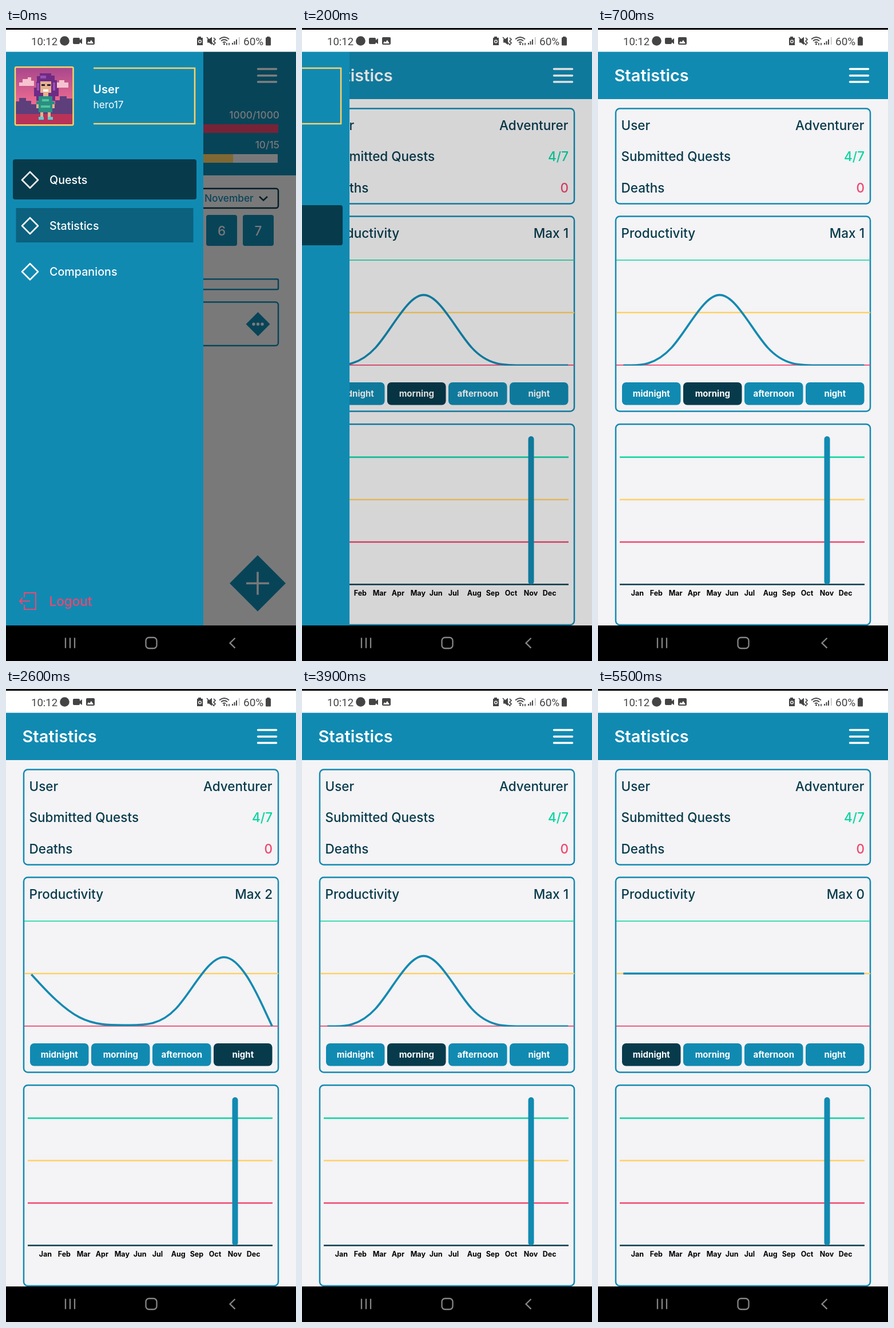
These frames come from a looping animation (507x1104 px, 5.6 s). An HTML page:

```html
<!DOCTYPE html>
<html lang="en">
<head>
<meta charset="utf-8">
<title>Statistics screen</title>
<style>
  html, body { margin: 0; height: 100%; overflow: hidden; background: #000; }
  svg { display: block; width: 100vw; height: 100vh; font: 500 22.5px Inter, sans-serif; }
  .blue { fill: #118ab2; }
  .dark { fill: #073b4c; }
  .pale { fill: #f4f3f5; }
  .line { fill: none; stroke: #118ab2; stroke-width: 2.5; }
  .icon { fill: none; stroke: #fff; stroke-width: 2.6; stroke-linejoin: round; }
  .end { text-anchor: end; }
  .mid { text-anchor: middle; }
  .small { font-size: 17.3px; }
  .item { font-size: 19.7px; fill: #fff; }
  .tab { font-size: 15px; font-weight: 700; fill: #fff; }
  .month { font-size: 12.5px; font-weight: 700; fill: #000; }
</style>
</head>
<body>
<svg viewBox="0 0 507 1104">
  <defs>
    <clipPath id="plot"><rect x="32" y="404" width="444" height="184.7"/></clipPath>
    <linearGradient id="sky" x2="0" y2="1">
      <stop stop-color="#a8468c"/><stop offset=".6" stop-color="#ea6a90"/>
    </linearGradient>
    <path id="gem" d="M0-14 14 0 0 14-14 0z" class="icon"/>
  </defs>

  <rect class="pale" width="507" height="1104"/>

  <g id="questPage">
    <rect class="blue" y="41" width="507" height="216"/>
    <g class="small end" fill="#f4f3f5">
      <text x="478" y="158">1000/1000</text>
      <text x="478" y="209.500">10/15</text>
    </g>
    <rect x="300" y="168" width="176" height="15" fill="#ef476f"/>
    <rect class="pale" x="300" y="220" width="175" height="15"/>
    <rect x="300" y="220" width="97" height="15" fill="#ffd166"/>
    <rect x="300" y="280" width="176" height="34" rx="4" class="line" style="stroke:#073b4c"/>
    <text class="small blue" x="347" y="303">November</text>
    <path d="m443 294 7 6.500 7-6.500" class="line" style="stroke:#073b4c"/>
    <rect class="blue" x="350" y="326" width="54" height="54" rx="4"/>
    <rect class="blue" x="414" y="326" width="54" height="54" rx="4"/>
    <g class="mid" fill="#f4f3f5"><text x="377" y="362">6</text><text x="441" y="362">7</text></g>
    <rect x="300" y="438" width="176" height="18" rx="2" class="line"/>
    <rect x="300" y="478" width="176" height="76" rx="5" class="line"/>
    <path class="blue" d="m440.500 495.500 21 21-21 21-21-21z"/>
    <path d="M433 516.500h0m7.500 0h0m7.500 0h0" stroke="#f4f3f5" stroke-width="5.400" stroke-linecap="round"/>
    <path class="blue" d="m440 919.500 49 49-49 49-49-49z"/>
    <path d="M420 968.500h40m-20-20v40" stroke="#f4f3f5" stroke-width="3.500"/>
  </g>

  <g id="statPage">
    <rect class="blue" y="41" width="507" height="83"/>
    <text x="28.500" y="93" fill="#fff" style="font-size:29px;font-weight:600">Statistics</text>
    <g class="line">
      <rect x="31" y="140.500" width="445" height="166" rx="7"/>
      <rect x="31" y="328.500" width="445" height="340" rx="7"/>
      <rect x="31" y="691" width="445" height="350" rx="7"/>
    </g>
    <g class="dark">
      <text x="40.500" y="177.500">User</text>
      <text x="40.500" y="232">Submitted Quests</text>
      <text x="40.500" y="286.500">Deaths</text>
      <text x="40.500" y="366">Productivity</text>
      <g class="end">
        <text x="465.500" y="177.500">Adventurer</text>
        <text x="466" y="232" fill="#06d6a0">4/7</text>
        <text x="466" y="286.500" fill="#ef476f">0</text>
        <text x="466" y="366" id="max"></text>
      </g>
    </g>
    <g clip-path="url(#plot)" class="line">
      <path d="M32 404.300H476" stroke="#06d6a0"/>
      <path d="M32 496.300H476" stroke="#ffd166"/>
      <path d="M32 588.300H476" stroke="#ef476f"/>
      <path id="curve" stroke-width="3.600"/>
    </g>
    <g id="tabs"></g>
    <g class="line">
      <path d="M38 748.500H466" stroke="#06d6a0"/>
      <path d="M38 822.500H466" stroke="#ffd166"/>
      <path d="M38 896.500H466" stroke="#ef476f"/>
      <path d="M38 970.500H466" stroke="#073b4c"/>
      <path d="M400.500 717V965.500" stroke-width="10" stroke-linecap="round"/>
    </g>
    <g id="months"></g>
  </g>

  <path d="M440.500 71.500h32m-32 11.500h32m-32 11h32" stroke="#fff" stroke-width="3.500" stroke-linecap="round"/>
  <rect id="shade" y="41" width="507" height="1001"/>

  <g id="drawer">
    <rect class="blue" y="41" width="345" height="1001"/>
    <g shape-rendering="crispEdges">
      <rect x="17" y="69" width="99" height="99" fill="url(#sky)"/>
      <path fill="#f6c3cf" d="M23 95h6v-6h9v-3h6v6h5v9H23zM87 95h6v-4h9v4h7v9H87z"/>
      <path fill="#5d3f7c" d="M17 128h6v-6h12v5h9v6h42v-7h8v-7h12v4h10v32H17z"/>
      <path fill="#b93358" d="M17 150h99v18H17z"/>
      <path fill="#6d2b86" d="M54 84h5v-5h20v4h6v8h4v14h3v14h-6v8h-8v-7H60v7h-7v-8h-4v-15h4z"/>
      <path fill="#e6b08e" d="M60 93h19v20h-5v6h-9v-6h-5zM53 128h5v12h-5zM80 128h5v12h-5z"/>
      <path fill="#9a4fb0" d="M60 83h10v5H60zM54 96h4v13h-4zM82 95h4v14h-4z"/>
      <path fill="#2b1b35" d="M62 98h6v3h-6zM72 98h6v3h-6z"/>
      <path fill="#fff" d="M65 107h9v4h-9z"/>
      <path fill="#2a8f83" d="M57 119h24v9h4v5h-4v14H57v-14h-4v-5h4z"/>
      <path fill="#51c49b" d="M63 124h12v4H63zM61 135h16v4H61z"/>
      <path fill="#e6b08e" d="M60 147h5v8h-5zM73 147h5v8h-5z"/>
      <path fill="#55d0d0" d="M57 155h9v5h-9zM73 155h9v5h-9z"/>
    </g>
    <rect x="16" y="68.300" width="101.500" height="101" rx="2" class="line" style="stroke:#ffd166"/>
    <path d="M153 70H330V167H153" class="line" style="stroke:#ffd166"/>
    <text x="152" y="114" fill="#fff" style="font-size:20.300px;font-weight:600">User</text>
    <text class="small" x="152.500" y="140" fill="#fff" style="font-weight:400">hero17</text>
    <rect id="pressed" class="dark" x="17.500" y="314" width="310" height="60" opacity=".5"/>
    <rect id="active" class="dark" x="12" width="321" height="70" rx="4"/>
    <g class="item">
      <use href="#gem" x="42" y="265"/><text x="76" y="272">Quests</text>
      <use href="#gem" x="42" y="345"/><text x="76" y="352">Statistics</text>
      <use href="#gem" x="42" y="425"/><text x="76" y="432">Companions</text>
    </g>
    <path d="M32 993V985H52V1014H32V1006M42 999.500H24m5-5.500-5 5.500 5 5.500" fill="none" stroke="#ef476f" stroke-width="2"/>
    <text x="75.500" y="1008" fill="#ef476f">Logout</text>
  </g>

  <path d="M0 0H507V41H0z"/>
  <path d="M0 3H507V41.500H0z" fill="#fff"/>
  <g fill="#444" style="font:400 18.500px Roboto, sans-serif">
    <text x="44" y="29.500">10:12</text>
    <text x="415" y="29.500" style="font-size:19px">60%</text>
    <circle cx="102.500" cy="22.500" r="8.300"/>
    <path d="M119 17h8q2 0 2 2v2l4-3v10l-4-3v1q0 2-2 2h-8q-2 0-2-2v-7q0-2 2-2z"/>
    <path fill-rule="evenodd" d="M142 16h11q2 0 2 2v9q0 2-2 2h-11q-2 0-2-2v-9q0-2 2-2zm0 11h11l-4-6-3 4-2-2z"/>
    <path d="M336 17v-2h5v2h3v13h-10V17z"/>
    <circle cx="339" cy="23.500" r="2.300" fill="none" stroke="#fff" stroke-width="1.300"/>
    <path d="M352 19.500h3l5-4v14l-5-4h-3z"/>
    <path d="M454 17.500v12q0 1 1 1h7q1 0 1-1v-12q0-1-1-1h-1v-1.500h-5v1.500h-1q-1 0-1 1z"/>
    <path d="M395 29v-3h2v3zM398.500 29v-6h2v6zM402 29v-9h2v9z"/>
    <path d="M407 29V16h1.500v13z" fill="#bbb"/>
    <g fill="none" stroke="#444" stroke-width="1.700">
      <path d="m351 16 13 14m-1-13 3 3-3 3 3 3-3 3"/>
      <path d="M373 19.500q8.500-7 17 0M376 22.500q5.500-4.500 11 0M379 25.500q2.500-2 5 0M382 28.500h0M386 26v4m4-4v4"/>
    </g>
    <circle cx="381.500" cy="28" r="1.500"/>
  </g>

  <path d="M0 1042H507V1104H0z"/>
  <g fill="none" stroke="#858585" stroke-width="2.300">
    <path d="M104 1063.500v18m8-18v18m8-18v18"/>
    <rect x="244.500" y="1063" width="19" height="19" rx="5.500"/>
    <path d="m400.500 1064-9 8.700 9 8.700"/>
  </g>
</svg>
<script>
const $ = id => document.getElementById(id);
const LOOP = 5600, STEP = 100, MORPH = 600;

// Chart levels (0 bottom, 1 top) per tab
const tabs = [
  { name: 'midnight', max: 0, levels: [.5, .5, .5, .5, .5, .5] },
  { name: 'morning', max: 1, levels: [0, 0, 1, 0, 0, 0] },
  { name: 'afternoon' },
  { name: 'night', max: 2, levels: [.5, 0, 0, 0, 1, 0] },
];
// Tab changes: when shown, when the curve starts to morph
const changes = [
  { at: 0, start: -MORPH, tab: 1 },
  { at: 2600, start: 2010, tab: 3 },
  { at: 3200, start: 3205, tab: 1 },
  { at: 4900, start: 4890, tab: 0 },
];

$('tabs').innerHTML = tabs.map(({ name }, i) =>
  `<rect x="${42 + 107 * i}" y="618" width="102.5" height="39.5" rx="7"/>
   <text class="tab mid" x="${93.3 + 107 * i}" y="643">${name}</text>`).join('');
const buttons = $('tabs').querySelectorAll('rect');
$('months').innerHTML = 'Jan Feb Mar Apr May Jun Jul Aug Sep Oct Nov Dec'.split(' ')
  .map((m, i) => `<text class="month" x="${57.7 + 33 * i}" y="989.5">${m}</text>`).join('');

// Uniform B-spline through the levels, ends joined by straight lines
function spline(levels) {
  const p = levels.map((v, i) => [44.3 + 84.2 * i, 588.3 - 184 * v]);
  const last = p[p.length - 1];
  const blend = (a, b, c, u, v, w) =>
    [0, 1].map(k => ((a[k] * u + b[k] * v + c[k] * w) / (u + v + w)).toFixed(2));
  let d = `M${p[0]}L${blend(p[0], p[1], last, 5, 1, 0)}`;
  for (let i = 2; i <= p.length; i++) {
    const a = p[i - 2], b = p[i - 1], c = p[i] || last;
    d += `C${blend(a, b, c, 2, 1, 0)} ${blend(a, b, c, 1, 2, 0)} ${blend(a, b, c, 1, 4, 1)}`;
  }
  return `${d}L${last}`;
}

function draw(t) {
  const open = t < 700 ? Math.exp(-t * .00712) : 0;
  const onQuests = t < 100;
  const show = (id, on) => $(id).setAttribute('display', on ? 'inline' : 'none');
  show('questPage', onQuests);
  show('statPage', !onQuests);
  show('pressed', onQuests);
  show('drawer', open);
  $('shade').setAttribute('opacity', open / 2);
  $('drawer').setAttribute('transform', `translate(${345 * (open - 1)})`);
  $('active').setAttribute('y', onQuests ? 229 : 309);

  const n = changes.filter(c => c.at <= t).length - 1;
  const { start, tab } = changes[n];
  const from = tabs[changes[Math.max(n - 1, 0)].tab].levels;
  const k = Math.min(1, Math.max(0, (t - start) / MORPH));
  $('curve').setAttribute('d', spline(tabs[tab].levels.map((v, i) => from[i] + (v - from[i]) * k)));
  $('max').textContent = `Max ${tabs[tab].max}`;
  buttons.forEach((b, i) => b.setAttribute('class', i === tab ? 'dark' : 'blue'));
}

const begin = performance.now();
function tick() {
  const t = (performance.now() - begin) % LOOP;
  draw(Math.floor(t / STEP) * STEP);
  requestAnimationFrame(tick);
}
tick();
</script>
</body>
</html>
```
